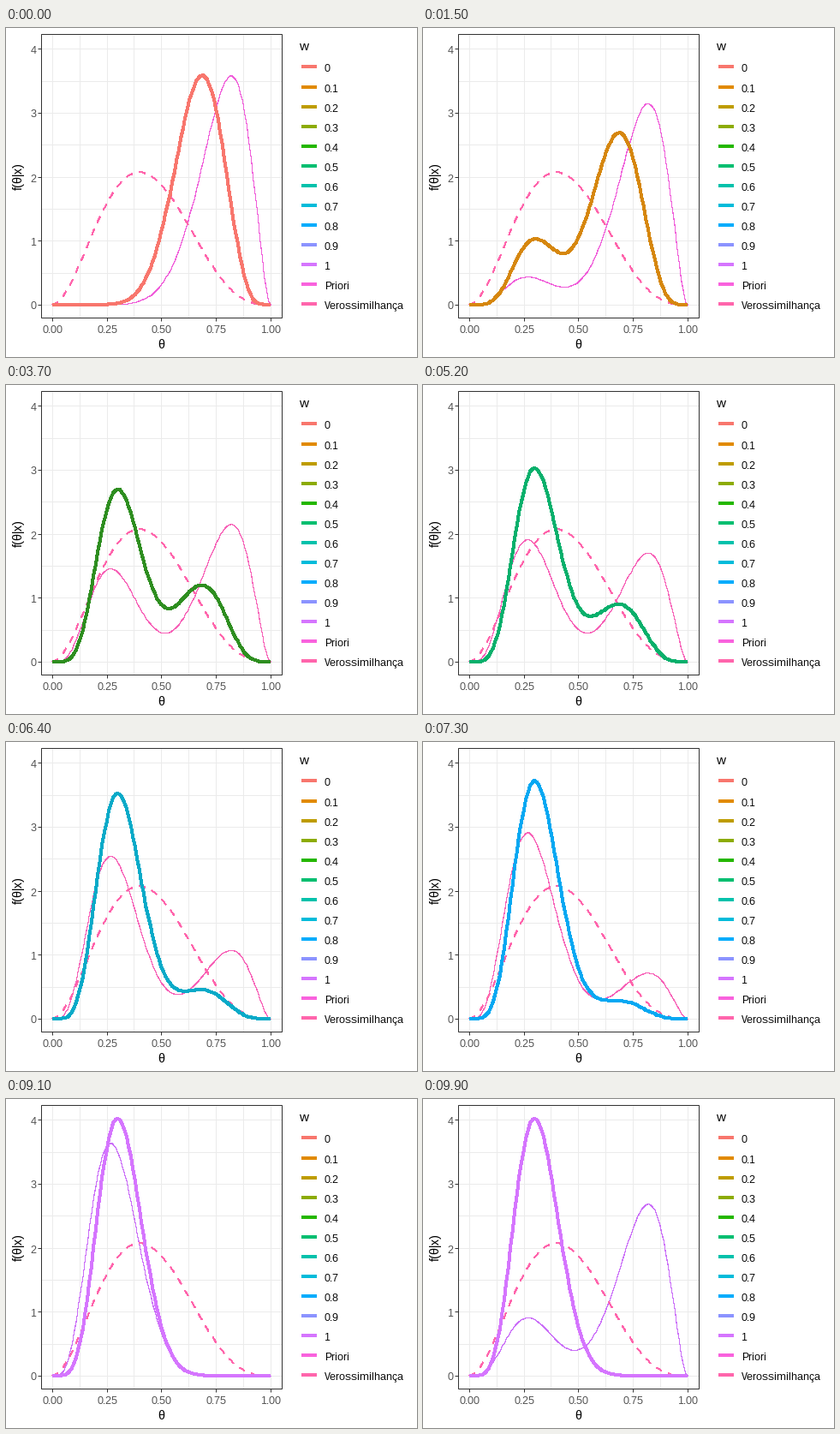
Recreate the animation shown at these times as a matplotlib script. Size 480x384 px, loop 10000 ms.

```python
import math

import matplotlib.pyplot as plt
import numpy as np
from matplotlib.animation import FuncAnimation
from matplotlib.patches import Rectangle

# Fully hinted glyphs give whole-pixel letter widths
plt.rcParams.update({"font.family": "Liberation Sans", "text.hinting": "native",
                     "text.hinting_factor": 1, "path.simplify": False})

WIDTH, HEIGHT, DPI = 480, 384, 96
PX = 72 / DPI
FRAMES, INTERVAL = 100, 100

LEGEND = ["#F8766D", "#E18A00", "#BE9C00", "#8CAB00", "#24B700", "#00BE70",
          "#00C1AB", "#00BBDA", "#00ACFC", "#8B93FF", "#D575FE", "#F962DD",
          "#FF65AC"]
LABELS = ["0"] + [f"0.{i}" for i in range(1, 10)] + ["1", "Priori", "Verossimilhança"]
POSTERIOR = ["#F8766D", "#D6870E", "#B18F1A", "#86A012", "#2E8E20", "#08B06C",
             "#08B4A0", "#08AAC8", "#06A8F2", "#8B93FF", "#D575FE"]
MAGENTA, PINK, PURPLE = "#F05FDA", "#F763B8", "#CB70F8"

# Frame at which each move to the next weight begins, and its step count
STARTS = [5, 15] + list(range(25, 98, 9))
STEPS = [5, 5] + [4] * 9


def beta_fn(a, b):
    return math.gamma(a) * math.gamma(b) / math.gamma(a + b)


def beta_pdf(t, a, b):
    return t ** (a - 1) * (1 - t) ** (b - 1) / beta_fn(a, b)


theta = np.linspace(0, 1, 101)
LOW, HIGH = (5, 12), (10, 3)
HITS, MISSES = 2, 3
LOW_POST = (LOW[0] + HITS, LOW[1] + MISSES)
HIGH_POST = (HIGH[0] + HITS, HIGH[1] + MISSES)


def prior(w):
    return w * beta_pdf(theta, *LOW) + (1 - w) * beta_pdf(theta, *HIGH)


def posterior(w):
    a = w * beta_fn(*LOW_POST) / beta_fn(*LOW)
    b = (1 - w) * beta_fn(*HIGH_POST) / beta_fn(*HIGH)
    return (a * beta_pdf(theta, *LOW_POST) + b * beta_pdf(theta, *HIGH_POST)) / (a + b)


def px(t):
    return np.floor(54.3 + 255 * t)


def py(f):
    return np.floor(323.35 - 74.6 * f)


fig = plt.figure(figsize=(WIDTH / DPI, HEIGHT / DPI), dpi=DPI, facecolor="white")
ax = fig.add_axes([0, 0, 1, 1])
ax.set_xlim(0, WIDTH)
ax.set_ylim(HEIGHT, 0)
ax.axis("off")


def rule(x, y, color):
    ax.plot(x, y, color=color, lw=PX, snap=True, solid_capstyle="butt")


def stroke(x, y, color, width, **kw):
    # A hard-edged stroke fills every pixel it touches, about one more than its width
    return ax.plot(x, y, color=color, lw=(width - 0.95) * PX, antialiased=False,
                   snap=False, solid_capstyle="butt", **kw)[0]


def label(x, y, s, size=9, color="black", **kw):
    kw = {"va": "center_baseline", **kw}
    ax.text(x, y, s, fontsize=size, color=color, **kw)


LEFT, RIGHT, TOP, BOTTOM = 41, 322, 7, 338
GRID, DARK, GREY = "#EBEBEB", "#333333", "#4D4D4D"
TITLE = 11.25

for i in range(9):
    x, y = px(i / 8), py(i / 2)
    rule([x, x], [TOP, BOTTOM], GRID)
    rule([LEFT, RIGHT], [y, y], GRID)
    if i % 2 == 0:
        rule([x, x], [BOTTOM, BOTTOM + 4], DARK)
        rule([LEFT - 4, LEFT], [y, y], DARK)
        label(x + 0.5, 352, f"{i / 8:.2f}", color=GREY, ha="center")
        label(35.5, y + 1, f"{i // 2}", color=GREY, ha="right")

label(181.5, 369, "θ", TITLE, ha="center")
label(15, 173, "f(θ|x)", TITLE, ha="center", va="center", rotation=90)
label(342, 21, "w", TITLE)
for i, (name, color) in enumerate(zip(LABELS, LEGEND)):
    y = math.floor(45.98 + 23.04 * i)
    stroke([345.1, 362.9], [y, y], color, 3.9)
    label(372, y + 1.5, name)

prior_line = stroke(px(theta) + 0.5, py(prior(0)) + 0.5, MAGENTA, 1, zorder=3)
stroke(px(theta), py(beta_pdf(theta, HITS + 1, MISSES + 1)), LEGEND[-1], 1.95,
       linestyle=(0, (7.5, 8.5)), dash_capstyle="butt", zorder=4)
post_line = stroke(px(theta), py(posterior(0)), POSTERIOR[0], 3.9, zorder=5)
ax.add_patch(Rectangle((LEFT, TOP), RIGHT - LEFT, BOTTOM - TOP, fill=False,
                       ec=DARK, lw=PX, snap=True, zorder=6))


def position(frame):
    """Current state and the share of the move to the next one."""
    state = 0
    for start, steps in zip(STARTS, STEPS):
        if frame < start:
            break
        done = (frame - start + 1) / steps
        if done < 1:
            return state, done
        state += 1
    return state, 0


def update(frame):
    state, share = position(frame)
    w = state / 10
    target = ((state + 1) % 11) / 10
    # The prior glides between weights; the posterior jumps at the end
    prior_line.set_ydata(py(prior(w + (target - w) * share)) + 0.5)
    prior_line.set_color(MAGENTA if state < 4 else PINK if state < 10 else PURPLE)
    post_line.set_ydata(py(posterior(w)))
    post_line.set_color(POSTERIOR[state])
    return prior_line, post_line


anim = FuncAnimation(fig, update, frames=FRAMES, interval=INTERVAL,
                     repeat=True, repeat_delay=0)
plt.show()
```
